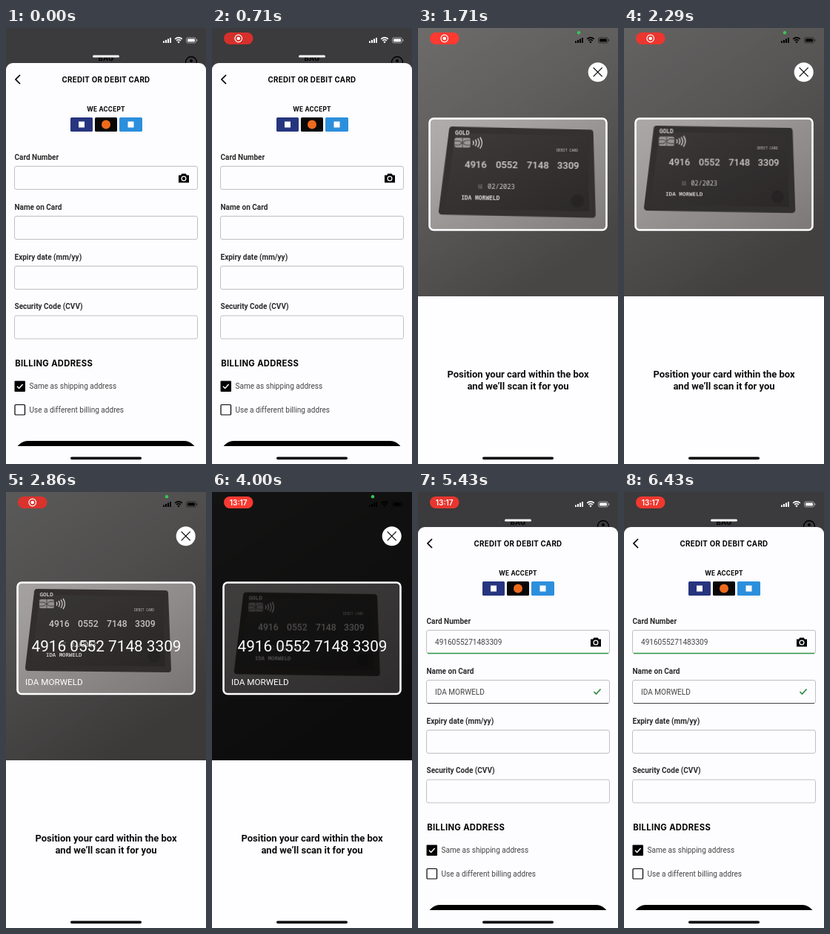
Recreate the animation shown at these times as an HTML page. Size 270 px wide and 585 px high, loop 6.57 s.

```html
<!DOCTYPE html>
<html lang="en">
<head>
<meta charset="utf-8">
<title>Card scan</title>
<style>
html, body { margin: 0; height: 100%; overflow: hidden; background: #fff; }
svg { display: block; width: 100vw; height: 100vh; }
text { font-family: Roboto, sans-serif; }
.head { font-family: Inter, sans-serif; font-weight: 700; letter-spacing: .03em; text-anchor: middle; }
.time { font-family: Inter, sans-serif; font-weight: 600; font-size: 10px; text-anchor: middle; }
.label { font-size: 10px; font-weight: 600; fill: #2b2b2b; }
.body { font-size: 10.05px; fill: #444; }
.mid { text-anchor: middle; }
.field { fill: #fdfcfe; stroke: #c0bfc1; }
.mono { font-family: "Noto Sans Mono", monospace; }
.line { fill: none; stroke: #000; }

/* One shared loop */
.cam, .card, .dark, .dim, .scan, .filled, .pill, .red, .rec, .clock, .dot {
  animation: 6570ms linear infinite;
}
.cam { animation-name: cam; }
.card { animation-name: card; animation-timing-function: ease-in-out; }
.dark { animation-name: dark; }
.dim { animation-name: dim; }
.pill { animation-name: pill; }
.red { animation-name: red; }
.scan { animation-name: scan; }
.filled { animation-name: filled; }
.rec { animation-name: rec; }
.clock { animation-name: clock; }
.dot { animation-name: dot; }
.scan, .filled, .rec, .clock, .dot { animation-timing-function: step-end; }

@keyframes cam {
  0%, 11.2% { opacity: 0; }
  15.22% { opacity: .93; }
  16.2%, 75.9% { opacity: 1; }
  78.23% { opacity: .67; }
  82.2%, 100% { opacity: 0; }
}
@keyframes card {
  0%, 15.22% { transform: translate(30px, 208.5px) rotate(1.2deg) scale(1.13); }
  26.03% { transform: translate(63px, 183px) rotate(.6deg) scale(1.076); }
  43.53% { transform: translate(58px, 177px) rotate(0deg) scale(1); }
  60.88% { transform: translate(62px, 181.5px) rotate(.2deg) scale(1); }
  78.23%, 100% { transform: translate(62px, 181px) rotate(.2deg) scale(1); }
}
@keyframes dark {
  0%, 26.03% { opacity: 0; }
  43.53% { opacity: .06; }
  52%, 100% { opacity: .64; }
}
@keyframes dim {
  0%, 26.03% { opacity: .43; }
  43.53% { opacity: .49; }
  52%, 100% { opacity: .72; }
}
@keyframes pill {
  0%, 2.13% { opacity: 0; }
  8.7%, 100% { opacity: 1; }
}
@keyframes red {
  0%, 15.22% { fill: #d6302c; }
  26.03% { fill: #ff3a31; }
  43.53% { fill: #da332d; }
  60.88% { fill: #f83a32; }
  69% { fill: #e0342e; }
  78.23% { fill: #f23931; }
  88% { fill: #dc332d; }
  98%, 100% { fill: #f0382f; }
}
@keyframes scan { 0% { opacity: 0; } 36.99%, 100% { opacity: 1; } }
@keyframes filled { 0% { opacity: 0; } 50%, 100% { opacity: 1; } }
@keyframes rec { 0% { opacity: 1; } 54.34%, 100% { opacity: 0; } }
@keyframes clock { 0% { opacity: 0; } 54.34%, 100% { opacity: 1; } }
@keyframes dot { 0% { opacity: 0; } 17.35% { opacity: 1; } 73.9%, 100% { opacity: 0; } }
</style>
</head>
<body>
<svg viewBox="0 0 270 585" preserveAspectRatio="none">
  <defs>
    <linearGradient id="desk" x1="0" y1="0" x2=".5" y2="1">
      <stop offset="0" stop-color="#c0bebd"/>
      <stop offset=".45" stop-color="#a8a4a3"/>
      <stop offset="1" stop-color="#7f7a7a"/>
    </linearGradient>
    <linearGradient id="plastic" x1="0" y1="0" x2="1" y2="1">
      <stop offset="0" stop-color="#3e3b3a"/>
      <stop offset="1" stop-color="#2b2828"/>
    </linearGradient>
    <clipPath id="view"><rect width="270" height="360"/></clipPath>
    <clipPath id="safe"><rect width="270" height="561"/></clipPath>
    <g id="status">
      <path d="M212 20v-2.5h2v2.5zM215 20v-4h2v4zM218 20v-5.5h2v5.5zM221 20v-7h2v7z"/>
      <path d="M228.2 14.8a7 7 0 0 1 9.6 0M230.1 17a4.2 4.2 0 0 1 5.8 0" fill="none" stroke="currentColor" stroke-width="1.6"/>
      <path d="M231.3 18.4a2.6 2.6 0 0 1 3.4 0l-1.7 2z"/>
      <rect x="243.5" y="13" width="13" height="7" rx="2" fill="none" stroke="currentColor" stroke-opacity=".5"/>
      <rect x="245" y="14.5" width="10" height="4" rx="1"/>
      <rect x="257.5" y="15.2" width="1" height="2.6" opacity=".6"/>
    </g>
  </defs>

  <!-- Form -->
  <rect width="270" height="585" fill="#3b3a3c"/>
  <text class="head" x="135" y="44" font-size="9.6">BAG</text>
  <circle class="line" cx="250" cy="46" r="7.5" stroke-width="1.3"/>
  <circle cx="250" cy="44" r="2"/>
  <rect x="117" y="36.5" width="36" height="3" rx="1.5" fill="#fff"/>
  <use href="#status" fill="#fff" color="#fff"/>
  <path d="M0 585V56a9 9 0 0 1 9-9h252a9 9 0 0 1 9 9v529z" fill="#fdfcfe"/>
  <path class="line" d="M19 63l-6 6 6 6" stroke-width="1.7"/>
  <text class="head" x="135" y="72.6" font-size="9.75">CREDIT OR DEBIT CARD</text>
  <text class="head" x="135" y="112.1" font-size="8.25">WE ACCEPT</text>
  <rect x="87" y="120" width="30" height="19" rx="1.5" fill="#27357f"/>
  <rect x="98" y="125.5" width="8" height="8" fill="#fff"/>
  <rect x="120" y="120" width="30" height="19" rx="1.5" fill="#080808"/>
  <circle cx="135" cy="129.5" r="6" fill="#ee6a1d"/>
  <rect x="153" y="120" width="31" height="19" rx="1.5" fill="#2c8fdc"/>
  <rect x="164.5" y="125.5" width="8" height="8" fill="#fff"/>

  <g class="label">
    <text x="11.5" y="177.3">Card Number</text>
    <text x="11.5" y="244">Name on Card</text>
    <text x="11.5" y="310.7">Expiry date (mm/yy)</text>
    <text x="11.5" y="377.3">Security Code (CVV)</text>
  </g>
  <g class="field">
    <rect x="11.5" y="185.5" width="247" height="31" rx="2.5"/>
    <rect x="11.5" y="252.5" width="247" height="31" rx="2.5"/>
    <rect x="11.5" y="319.5" width="247" height="31" rx="2.5"/>
    <rect x="11.5" y="386" width="247" height="31" rx="2.5"/>
  </g>
  <path d="M233 197.5h3l1.3-2h5.4l1.3 2h3v10h-14z"/>
  <circle cx="240" cy="202" r="2.9" fill="none" stroke="#fff" stroke-width="1.3"/>
  <g class="filled">
    <text class="body" x="23" y="205">4916055271483309</text>
    <text class="body" x="23" y="271.5">IDA MORWELD</text>
    <path d="M13 216.5h244" stroke="#2d9443" stroke-width="1.4"/>
    <path d="M13 283.5h244" stroke="#444" stroke-width="1.2"/>
    <path class="line" d="M237.5 268l3 3 6-6.5" style="stroke:#2b8a40" stroke-width="1.7"/>
  </g>

  <text class="head" x="64.7" y="454.4" font-size="11.25">BILLING ADDRESS</text>
  <rect x="11.5" y="473.5" width="14.5" height="14.5" rx="1"/>
  <path d="M15 480.8l2.6 2.7 5-5.6" fill="none" stroke="#fff" stroke-width="1.5"/>
  <text class="body" x="31.5" y="484.2">Same as shipping address</text>
  <rect class="line" x="12" y="505.5" width="13.5" height="13.5" rx="1" stroke-width="1.2"/>
  <text class="body" x="31.5" y="515.8">Use a different billing addres</text>
  <rect x="12" y="554" width="246" height="36" rx="18" clip-path="url(#safe)"/>

  <!-- Scanner -->
  <g class="cam">
    <rect y="360" width="270" height="225" fill="#fefdff"/>
    <g clip-path="url(#view)">
      <rect width="270" height="360" fill="url(#desk)"/>
      <g class="card" fill="#d3d1cf">
        <path d="M-16-43L157-41 161 61-28 59z" fill="url(#plastic)" stroke="#343130" stroke-width="8" stroke-linejoin="round"/>
        <text class="mono" x="-12.5" y="-37" font-size="7.6" font-weight="600">GOLD</text>
        <rect x="-13" y="-33" width="20" height="12" rx="2.5" fill="#9b9896"/>
        <path d="M-13-29h6l8 5h6M-13-24h6l8-6h6M-3-33v12" fill="none" stroke="#4b4847"/>
        <path d="M10-29.5q2 2.5 0 5M13-31q3 4 0 8M16-32.5q4 5.5 0 11M19-34q5 7 0 14" fill="none" stroke="#d8d6d4" stroke-width="1.3"/>
        <text class="mono" x="115" y="-17.5" font-size="4.5">DEBIT CARD</text>
        <g class="mono" font-size="12.2" font-weight="500">
          <text x="0" y="4.3">4916</text>
          <text x="39" y="4.3">0552</text>
          <text x="78" y="4.3">7148</text>
          <text x="116" y="4.3">3309</text>
        </g>
        <text class="mono" x="17" y="27" font-size="3.2" opacity=".6">EXP</text>
        <text class="mono" x="17" y="30.5" font-size="3.2" opacity=".6">END</text>
        <text class="mono" x="29" y="30.5" font-size="8.2">02/2023</text>
        <text class="mono" x="-4" y="43.8" font-size="7.35" font-weight="600">IDA MORWELD</text>
        <circle cx="142" cy="44" r="8" fill="#272425"/>
      </g>
      <rect class="dark" width="270" height="360"/>
      <path class="dim" d="M0 0h270v360H0zM15 127v138a6 6 0 0 0 6 6h228a6 6 0 0 0 6-6V127a6 6 0 0 0-6-6H21a6 6 0 0 0-6 6z" fill-rule="evenodd"/>
    </g>
    <use href="#status" color="#000"/>
    <rect x="15.5" y="121.5" width="239" height="149.5" rx="5.5" fill="none" stroke="#fff" stroke-width="2.6"/>
    <g class="scan" fill="#fff">
      <text class="mid" x="135.5" y="214" font-size="20.75">4916 0552 7148 3309</text>
      <text x="26" y="258.5" font-size="11.7">IDA MORWELD</text>
    </g>
    <circle cx="242.7" cy="59.2" r="13" fill="#fff"/>
    <path class="line" d="M236.7 53.2l12 12M248.7 53.2l-12 12" stroke-width="1.2"/>
    <g class="mid" font-size="13" font-weight="700" fill="#0c0c0c">
      <text x="135" y="469.3">Position your card within the box</text>
      <text x="135" y="484.6">and we’ll scan it for you</text>
    </g>
  </g>

  <!-- System overlay -->
  <circle class="dot" cx="217" cy="6.3" r="2.2" fill="#35c759"/>
  <g class="pill">
    <rect class="red" x="16" y="6" width="39.5" height="16" rx="8"/>
    <g class="rec" fill="#fff">
      <circle cx="35.7" cy="14" r="4.8" fill="none" stroke="#fff" stroke-width="1.2"/>
      <circle cx="35.7" cy="14" r="2.3"/>
    </g>
    <g class="clock"><text class="time" x="35.7" y="17.6" fill="#fff">13:17</text></g>
  </g>
  <rect x="87" y="575.5" width="96" height="3.4" rx="1.7"/>
</svg>
</body>
</html>
```
